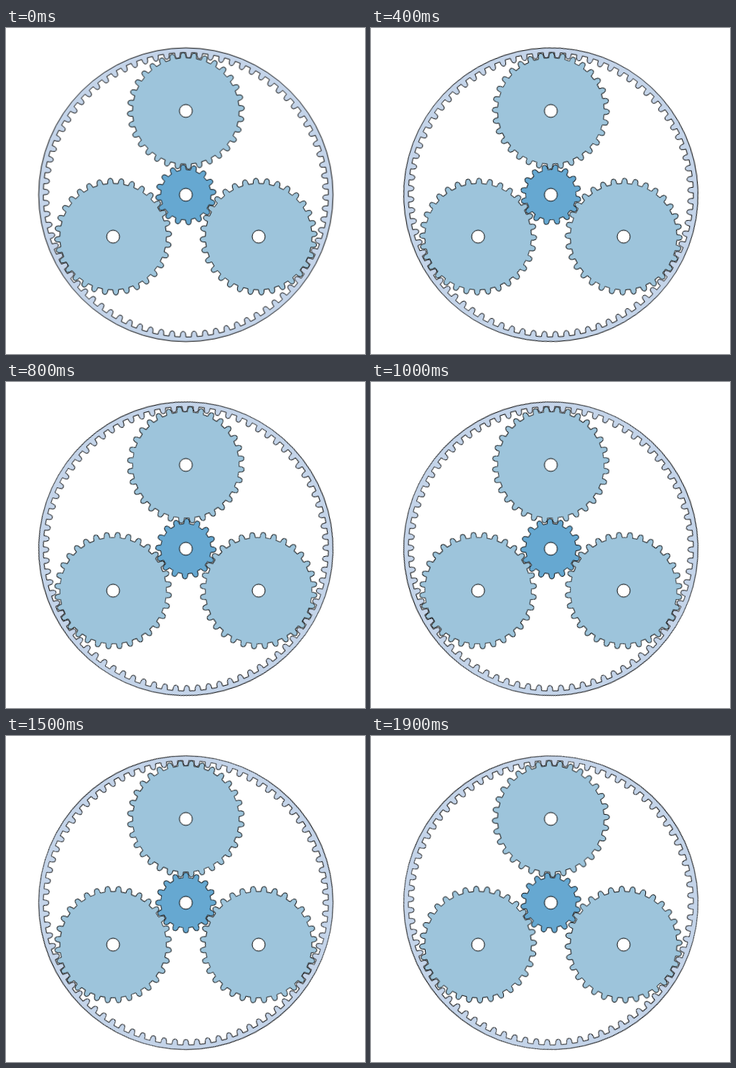
An HTML page that plays this animation: 500x455 px, repeating every 2 s.

```html
<!DOCTYPE html>
<html lang="en">
<head>
<meta charset="utf-8">
<title>Planetary gear</title>
<style>
  html, body { margin: 0; width: 100%; height: 100%; overflow: hidden; background: #fff; }
  svg { display: block; width: 500px; height: 455px; }
  path, circle { stroke: #000; stroke-width: 1; stroke-linejoin: round; }
  .hole { fill: #fff; }
  .ring { fill: #c4d4e9; fill-rule: evenodd; --teeth: -80; }
  .planet { fill: #9dc4db; --teeth: -32; }
  .sun { fill: #66a8d1; --teeth: 16; }
  /* 20 held poses, each 5/12 of a tooth after the last. */
  .gear { transform-origin: 0 0; animation: turn 2s steps(20, jump-none) infinite; }
  @keyframes turn {
    from { transform: rotate(0deg); }
    to { transform: rotate(calc(19 * 5 / 12 * 360deg / var(--teeth))); }
  }
</style>
</head>
<body>
<svg viewBox="0 0 500 455">
  <g id="train" transform="translate(250.5 232.7)"></g>
</svg>
<script>
  const train = document.getElementById('train');
  const DISTANCE = 117;
  const HOLE = 9;

  function add(parent, tag, attributes) {
    const node = document.createElementNS('http://www.w3.org/2000/svg', tag);
    for (const [name, value] of Object.entries(attributes)) node.setAttribute(name, value);
    return parent.appendChild(node);
  }

  // Toothed outline; phase is in tooth pitches, clockwise from the top.
  function outline({ teeth, root, pitch, tip, phase }) {
    let d = '';
    for (let i = 0; i < teeth; i++) {
      const middle = (i + phase) * 2 * Math.PI / teeth;
      const at = (radius, offset) => {
        const angle = middle + offset / radius;
        return `${(radius * Math.sin(angle)).toFixed(2)} ${(-radius * Math.cos(angle)).toFixed(2)}`;
      };
      d += `${i ? 'L' : 'M'}${at(root, -4)}L${at(pitch, -3.6)}`
        + `Q${at(tip, -3)} ${at(tip, 0)}Q${at(tip, 3)} ${at(pitch, 3.6)}L${at(root, 4)}`;
    }
    return d + 'Z';
  }

  function addGear(kind, shape, x = 0, y = 0, rim = '') {
    const place = add(train, 'g', { transform: `translate(${x} ${y})` });
    add(place, 'path', { class: `gear ${kind}`, d: rim + outline(shape) });
    if (!rim) add(place, 'circle', { class: 'hole', r: HOLE });
  }

  const ring = { teeth: 80, root: 198.5, pitch: 195, tip: 190.8, phase: 0.25 };
  const planet = { teeth: 32, root: 74.2, pitch: 78, tip: 81.6, phase: -0.25 };
  const sun = { teeth: 16, root: 35.1, pitch: 39, tip: 42.2, phase: -0.25 };

  addGear('ring', ring, 0, 0, 'M0-205A205 205 0 1 1 0 205A205 205 0 1 1 0-205Z');
  for (let i = 0; i < 3; i++) {
    const angle = i * 2 * Math.PI / 3;
    addGear('planet', planet, DISTANCE * Math.sin(angle), -DISTANCE * Math.cos(angle));
  }
  addGear('sun', sun);
</script>
</body>
</html>
```
